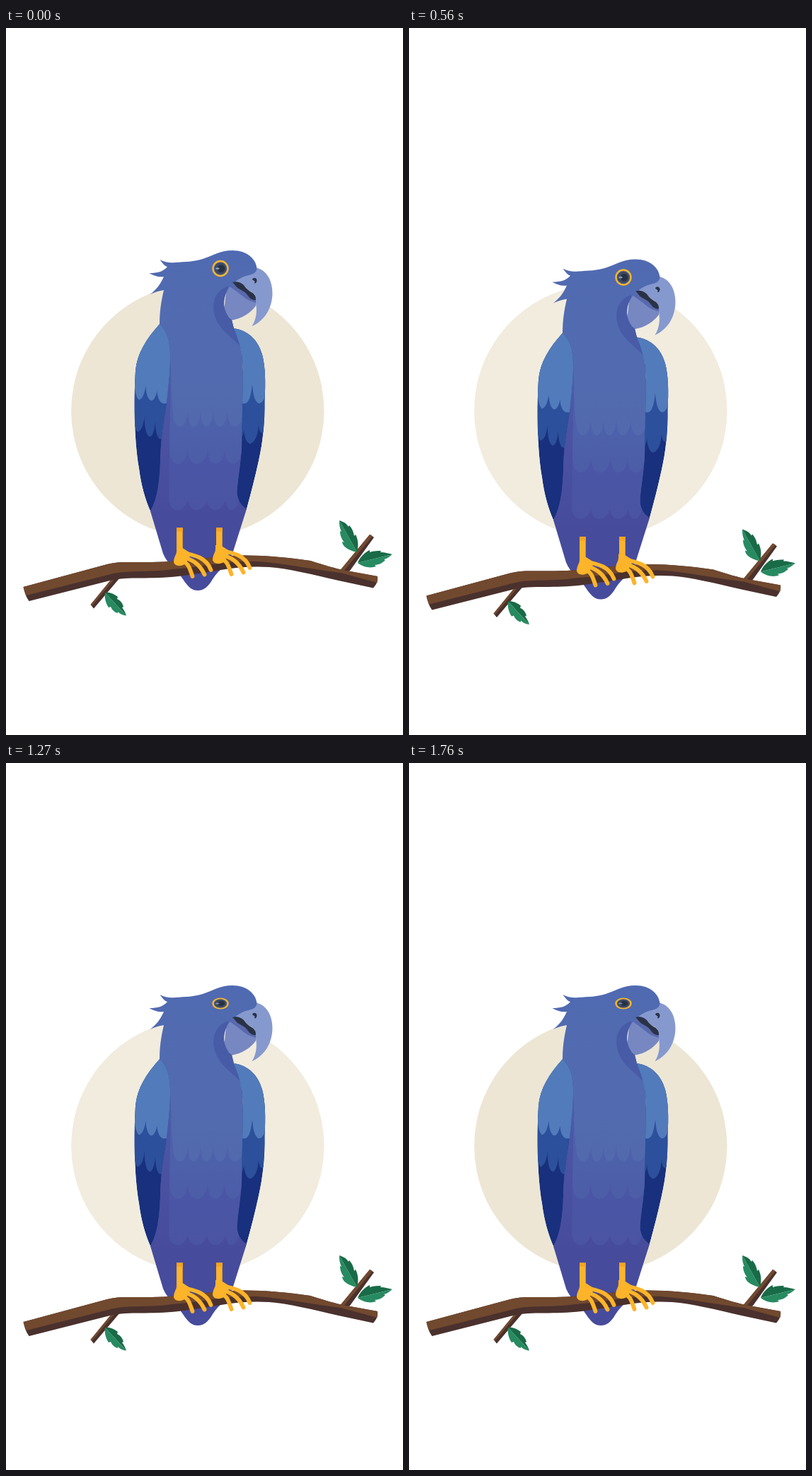
Animation, 561 px wide and 998 px high, one loop 1800 ms. Source, as an HTML page with a canvas:

```html
<!DOCTYPE html>
<html lang="en">
<head>
<meta charset="utf-8">
<title>Perched parrot</title>
<style>
html, body { margin: 0; width: 100%; height: 100%; overflow: hidden; background: #fff; }
canvas { display: block; width: 561px; height: 998px; }
</style>
</head>
<body>
<canvas id="stage"></canvas>
<script>
const W = 561, H = 998, LOOP = 1800, DROP = 12.5;
const canvas = document.getElementById('stage');
const ctx = canvas.getContext('2d');
const ratio = window.devicePixelRatio || 1;
canvas.width = Math.round(W * ratio);
canvas.height = Math.round(H * ratio);

// Each pose holds until the next one starts.
const poses = [
  { at: 0, sun: '#ede6d5', y: 0, lid: 1 },
  { at: 200, sun: '#eee9da', y: 0, lid: 1 },
  { at: 560, sun: '#f1ecde', y: DROP, lid: 1 },
  { at: 840, sun: '#f2eee2', y: DROP, lid: 1 },
  { at: 1080, sun: '#f1ecde', y: 0, lid: 0.68 },
  { at: 1400, sun: '#eee9da', y: 0, lid: 0.68 },
  { at: 1760, sun: '#ede6d5', y: 0, lid: 0.68 }
];

function fill(path, color) {
  ctx.fillStyle = color;
  ctx.fill(new Path2D(path));
}

function disc(x, y, r, color) {
  ctx.fillStyle = color;
  ctx.beginPath();
  ctx.arc(x, y, r, 0, Math.PI * 2);
  ctx.fill();
}

function fade(y0, y1, ...colors) {
  const g = ctx.createLinearGradient(0, y0, 0, y1);
  colors.forEach((c, i) => g.addColorStop(i / (colors.length - 1), c));
  return g;
}

// Row of rounded feather tips through the given notches.
function feathers(top, xs, notch, tip) {
  let d = `${top} L${xs[0]} ${notch}`;
  for (let i = 1; i < xs.length; i++) {
    const a = xs[i - 1], b = xs[i], w = b - a;
    d += ` C${a + w * 0.04} ${tip - 6} ${a + w * 0.2} ${tip} ${a + w * 0.45} ${tip}`;
    d += ` C${a + w * 0.75} ${tip} ${b - w * 0.06} ${tip - 8} ${b} ${notch}`;
  }
  return d + ' Z';
}

const leftWing = 'M217 418 C198 439 185 460 183 484 C180 535 182 588 188 622 C191 646 197 666 204 682 ' +
  'C214 665 217 640 218 612 C219 570 225 548 228 520 C231 494 233 470 231.5 452 C230 433 224 425 217 418 Z';
const rightWing = 'M322 424 C342 427 356 440 362 461 C366.500 478 367 500 365.5 526 C366 556 363 585 357 611 ' +
  'C352 634 346 657 340 679 C332 674 327 666 326.5 656 C327 638 332 615 333 590 L335 480 C334 455 328 439 322 424 Z';
const headTop = 'M217 418 C217 401 219 387 223 370 C216 371 210 373 203.5 376 C212 370 218 362 223 351 ' +
  'C216 352 209 350 202.5 346 C214 346 222 344 228 337 C224 336 221 332 217.5 327 C225 331 232 332 239 331 ' +
  'C253 330 266 330 278 326 C291 322 302 314 320 314 C341 314 353 326 354.5 339 ' +
  'C354 347 347 348 339 350 C329 353 321 360 315 367 C304 384 307 402 319 412 L322 424 C331 443 334 461 335 483 L336 542';

function drawWings() {
  ctx.save();
  ctx.clip(new Path2D(leftWing));
  fill(leftWing, '#18307d');
  fill('M175 410 H240 V580 H221 C215 583 211 572 211 556 C210 568 207 577 203 577 C197 574 196 562 195.5 548 ' +
    'C195 560 191 569 186 570 C183 568 182 562 181 550 H175 Z', '#2c509b');
  fill('M175 410 H240 V530 H222 C216 528 214 520 213.5 512 C212 520 209 526 205 526 C200 524 198 515 197.5 505 ' +
    'C196 517 192 524 188 525 C184 521 183 515 182 507 H175 Z', '#527bbb');
  ctx.restore();

  ctx.save();
  ctx.clip(new Path2D(rightWing));
  fill(rightWing, '#18307d');
  fill('M315 415 H375 V565 L363 571 C359 573 358 567 357 561 C356 574 352 585 345 587 ' +
    'C339 585 337 577 336 566 C336 575 333 580 328 583 Z', '#2c509b');
  fill('M315 415 H375 V510 L366 520 C364 526 361 530 357 530 C350 526 349 514 348 503 ' +
    'C346 519 344 528 338 530 L327 530 Z', '#527bbb');
  ctx.restore();
}

function drawBody() {
  fill('M226 425 L216 590 L204 682 L222 742 C228 757 241 764 250 778 C258 790 263 794 271 794 ' +
    'C279 794 285 790 292 778 C301 764 314 757 320 742 L340 679 L336 600 L334 460 Z',
    fade(430, 690, '#4c64ad', '#4b53a3', '#474b9c'));
  fill(feathers('M334 520 L232 520', [230, 257, 284, 310, 329], 666, 680.5), fade(590, 680, '#4a57a6', '#4a54a3'));
  fill(feathers('M335 500 L233 500', [231, 257, 285, 309, 334], 594, 615), fade(540, 615, '#4d62ab', '#4d5da8'));
}

function drawHead() {
  const blue = fade(314, 562, '#506ab1', '#526bb0', '#5269ad');
  fill(feathers('M336 500 L233 500', [236, 257, 275, 293, 313, 336], 541, 562.5), blue);
  fill(headTop + ' L236 542 L234 520 L232 455 C229 437 224 426 217 418 Z', blue);
  fill('M314 364 C297 371 291 384 294 402 C298 422 313 432 331 449 L322 424 L319 412 C307 402 304 384 314 367 Z', '#485ba7');
}

function drawBeak() {
  fill('M312 364 L308 400 L319 412.500 C334 410 346 402 353 392 L353 380 L325 356 Z', '#7787c2');
  fill('M312 362 C322 369 329 374 335 379 C342 385 348 386 353 388 L353 378 L322 356 Z', '#5969ad');
  fill('M350 338 C366 339 377 354 376.5 376 C375.5 397 365 413 347.5 421 C354 411 355 399 353 389 ' +
    'L353 381 C352 375 348 373 344 371 C339 368 337 361 325 358 L322 352 L340 342 Z', '#8699ce');
}

function drawMouth() {
  fill('M320 359 C326 357 332 359 336 363 C340 368 343 371 347 373 C351 375 353 379 353 384 ' +
    'C348 384 345 382 342 378 C338 372 334 371 329 368 C325 366 323 361 320 359 Z', '#293246');
  fill('M348 355 C349 351.5 355 352 354.5 357 C354 360 352 361 351 360 C353 357 350 357 348 355 Z', '#293246');
}

function drawEye(lid) {
  ctx.save();
  ctx.translate(303, 339.5);
  ctx.scale(1, lid);
  disc(0, 0, 11.7, '#f9b62b');
  disc(0, 0, 9.3, '#4c5f9c');
  disc(0, 0, 8.3, '#3d4a62');
  disc(1, 0, 5.2, '#263143');
  fill('M-7 0 C-6 -2 -3 -2 -1 0 C-3 2 -6 2 -7 0 Z', '#7f92b4');
  ctx.restore();
}

function drawLeaf(base, tip, sideA, sideB, a, b) {
  fill(`M${base} ${sideA} ${tip} Z`, a);
  fill(`M${base} ${sideB} ${tip} Z`, b);
}

function drawBranch() {
  const dark = '#4a312d', brown = '#71492f', deep = '#196b47', green = '#278a61';
  fill('M514 715 L520 719 L486 766 L479 770 L471 767 Z', dark);
  fill('M514 715 L518 717 L476 768 L471 767 Z', brown);
  fill('M149 778 L161 776 L124 819.5 L119.5 814 Z', dark);
  fill('M149 778 L153 778 L121.5 816 L119.5 814 Z', brown);

  const top = 'M24.5 789 L143 757 C158 753 171 754 187 754 C243 755 279 747 316 745 C356 743 394 747 430 752 C449 758 465 763 481 766 L525 774';
  fill(top + ' C526 781 523 786 519 790.5 L470 780 C431 771 399 763 372 761 C327 758 291 768 251 773 ' +
    'C211 779 181 774 151 779 L32.5 809 C28 803 26 796 24.5 789 Z', dark);
  fill(top + ' L524.5 783 L473 769 C431 764 395 756 355 753 C310 752 275 761 235 764 ' +
    'C203 769 174 765 152 770 L28.5 801 Z', brown);

  drawLeaf('496 740', '471 695',
    'C481 737 475 730 475 725 L478 726 C473 720 472 714 472 710 L474 711 C471 704 471 700',
    'C499 729 497 721 494 715 L492 717 C491 710 488 705 485 702 L484 704 C480 698 476 697', green, deep);
  drawLeaf('497 755', '546 743',
    'C500 747 507 740 514 737 L514 740 C520 738 526 738 530 738 L529 740 C536 740 541 742',
    'C504 761 515 763 523 760 L521 758 C528 758 533 754 536 751 L534 750 C539 749 542 746', deep, green);
  drawLeaf('140 797', '170 829.5',
    'C146 796 153 799 158 803 L157 806 C162 808 165 813 166 817 L164 818 C167 822 169 826',
    'C139 805 141 812 145 818 L148 817 C150 822 154 825 158 826 L158 824 C162 828 166 829', deep, green);
}

const palm = 'M241 733 L249.5 734 L262 742 L254 756 C249 760 239 761 237 754 C237 746 241 744 241 738 Z';
const toes = new Path2D('M245 751 C258 754 259 761 263.5 774 M247 746 C264 750 274 757 280.5 771.5 ' +
  'M248 740.5 C268 744 283 748 289.5 765');

function drawFeet() {
  ctx.strokeStyle = '#fcb42a';
  ctx.lineWidth = 5.8;
  ctx.lineCap = 'round';
  for (const [legX, dx, dy] of [[241, 0, 0], [297, 55, -3]]) {
    ctx.fillStyle = '#fcb42a';
    ctx.fillRect(legX, 705.5, 8.7, 32);
    ctx.fillStyle = '#f6a51f';
    ctx.fillRect(legX, 705.5, 8.7, 5.5);
    ctx.save();
    ctx.translate(dx, dy);
    fill(palm, '#fcb42a');
    ctx.stroke(toes);
    ctx.restore();
  }
}

function draw(ms) {
  const t = ms % LOOP;
  const pose = poses.filter(p => p.at <= t).pop();
  ctx.setTransform(ratio, 0, 0, ratio, 0, 0);
  ctx.fillStyle = '#fff';
  ctx.fillRect(0, 0, W, H);
  disc(270.8, 540.5, 178.7, pose.sun);
  ctx.translate(0, pose.y);
  drawBody();
  drawBeak();
  drawHead();
  drawMouth();
  drawWings();
  drawEye(pose.lid);
  drawBranch();
  drawFeet();
}

const start = performance.now();
function tick() {
  draw(Math.max(0, performance.now() - start));
  requestAnimationFrame(tick);
}
tick();
</script>
</body>
</html>
```
